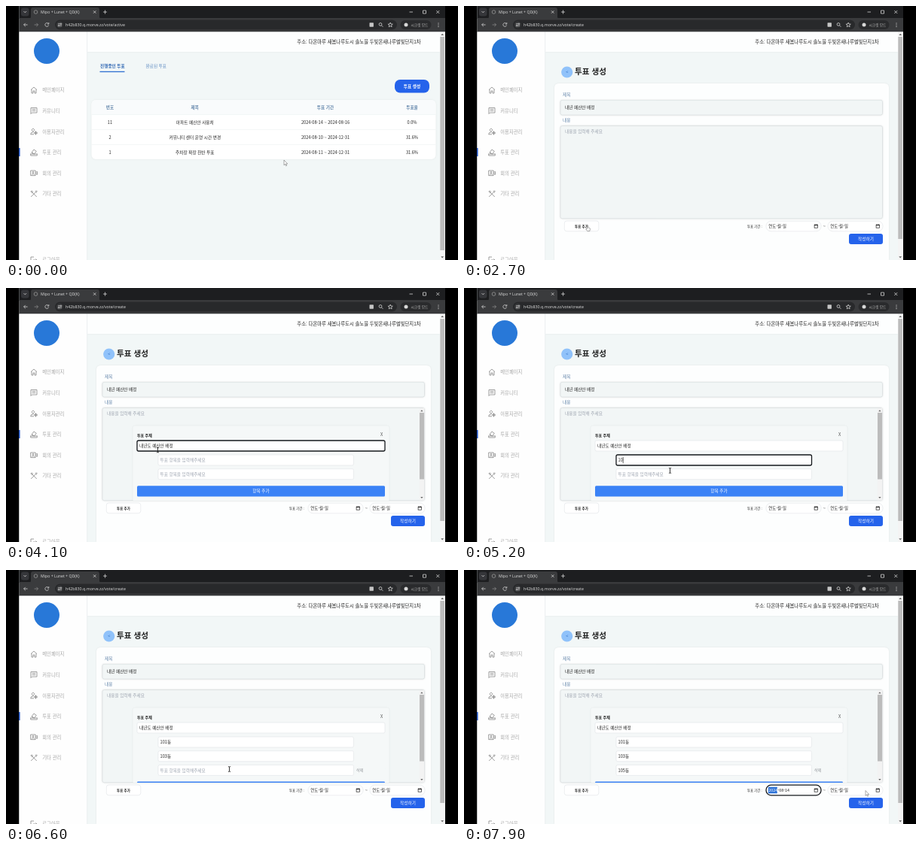
Animation, 600 px wide and 338 px high, one loop 8000 ms. Source, as an HTML page:

```html
<!DOCTYPE html>
<html lang="ko">
<head>
<meta charset="utf-8">
<title>투표 생성</title>
<style>
html, body { margin: 0; width: 100%; height: 100%; overflow: hidden; background: #000; }
svg { display: block; width: 100vw; height: 100vh; }
text { font: 5.65px "Noto Sans CJK KR", "Noto Sans CJK", "Noto Sans", sans-serif; fill: #222; white-space: pre; }
.m { text-anchor: middle; }
.b { font-weight: 700; }
.w { fill: #fff; }
.hint { fill: #9ca3af; }
.label { fill: #6386ab; }
.ui text { font-family: "Open Sans", "Noto Sans CJK KR", sans-serif; font-size: 5.2px; fill: #dedede; }
.ui path, .ui .o { fill: none; stroke: #d4d4d4; stroke-width: .8; }
.side text { font-size: 6.3px; fill: #a6a6a6; }
.side path { fill: none; stroke: #8d8d8d; stroke-width: .85; stroke-linejoin: round; }
.field { fill: #f2f6f6; stroke: #d3dadc; stroke-width: .6; filter: drop-shadow(0 .8px .8px #0002); }
.box { fill: #fff; stroke: #dfe3e6; stroke-width: .6; }
.focus { stroke: #15181c; stroke-width: 1.3; }
.card { filter: drop-shadow(0 .5px 1.2px #00000012); }
</style>
</head>
<body>
<svg viewBox="0 0 600 338" preserveAspectRatio="none">
  <defs>
    <clipPath id="area"><rect x="128" y="159" width="428" height="124"/></clipPath>
    <g id="cal">
      <rect x="-2.2" y="-1.8" width="4.4" height="4" fill="none" stroke="#222" stroke-width=".7"/>
      <path d="M-2.2-1.3H2.2M-1.2-2.6v1M1.2-2.6v1" stroke="#222" stroke-width=".9"/>
    </g>
  </defs>
  <rect width="600" height="338"/>
  <rect x="17.5" width="565.5" height="338" fill="#f2f7f7"/>

  <g class="ui">
    <rect x="17.5" width="565.5" height="17" fill="#1d1e20"/>
    <rect x="20" y="2.5" width="10.5" height="11" rx="3" fill="#35363a"/>
    <path d="M23.5 7l1.8 1.8L27.100 7"/>
    <path d="M30 17q3 0 3-3V5q0-3 3-3h85q3 0 3 3v9q0 3 3 3z" style="fill:#3a3b3d;stroke:none"/>
    <circle class="o" cx="39.500" cy="8" r="2.300" style="stroke:#999"/>
    <text x="46" y="10">Mipo + Lunet + QD(K)</text>
    <path d="M116 6.300l3.400 3.400m0-3.400L116 9.700M129 8h5m-2.500-2.500v5"/>
    <path d="M535.500 8h4.500M553.500 6h4v4h-4zM571.300 6l4 4m0-4l-4 4"/>
    <rect x="17.5" y="16" width="565.5" height="18.500" fill="#3a3b3d"/>
    <path d="M28.600 25h-5m2.200-2.200L23.600 25l2.200 2.200"/>
    <path d="M37.600 25h5m-2.200-2.200l2.200 2.200-2.200 2.200" style="stroke:#8a8a8a"/>
    <path d="M56.200 23.500a2.400 2.400 0 1 0 .4 2M56.800 22v2h-2"/>
    <rect x="65" y="18.500" width="454" height="13" rx="6.500" fill="#28292b"/>
    <circle cx="71.300" cy="25" r="4.200" fill="#3a3b3d"/>
    <path d="M69 23.800h3m-1 2.400h3"/>
    <circle class="o" cx="73" cy="23.800" r=".8"/><circle class="o" cx="70" cy="26.200" r=".8"/>
    <text id="url" x="79" y="27" style="font-size:5.300px"></text>
    <rect x="482.500" y="22.300" width="5.400" height="5.400" rx=".6" fill="#c6c6c6"/>
    <circle class="o" cx="497" cy="24.400" r="1.900"/><path d="M498.400 25.800l2 2"/>
    <path d="M510.200 22l.9 2 2.200.2-1.700 1.400.5 2.200-1.900-1.200-1.900 1.200.5-2.200-1.700-1.400 2.200-.2z"/>
    <rect x="523.500" y="19" width="41" height="12" rx="6" fill="#2a2b2d"/>
    <circle cx="531" cy="25" r="2.500" fill="#d8d8d8"/>
    <text x="537.500" y="26.800" style="font-size:4.700px;fill:#bbb">시크릿 모드</text>
    <path d="M574 22.500v5.600" style="stroke-dasharray:1 1.200;stroke-width:1.100"/>
  </g>

  <rect x="108" y="34.500" width="468" height="26.500" fill="#fdfefe" class="card"/>
  <text x="550.500" y="49.700" text-anchor="end" style="font-size:6.350px">주소: 다온마루 새봄나루도시 솔노을 두빛온새나루별빛단지1차</text>

  <g class="side">
    <rect x="17.500" y="34.500" width="90" height="303.500" fill="#fefefe"/>
    <path d="M107.700 34.500V338" style="stroke:#e6ebec;stroke-width:.6"/>
    <circle cx="54" cy="60" r="17" fill="#2878d8"/>
    <rect x="17" y="189" width="1.600" height="11" fill="#2457c5"/>
    <g id="menu"></g>
  </g>

  <rect x="576" y="34.500" width="7" height="303.500" fill="#f4f4f4"/>
  <rect id="thumb" x="576.300" y="41" width="5.700" fill="#bcbcbc"/>
  <path d="M577.300 39l1.900-2.300 1.900 2.300zM577.300 333.300l1.900 2.300 1.900-2.300z" fill="#666"/>

  <g id="list">
    <text class="b" x="125" y="82.300" style="fill:#2f67b3">진행중인 투표</text>
    <text x="185.500" y="82.300" style="fill:#5d8ac0">완료된 투표</text>
    <rect x="124.500" y="86.800" width="33" height="1.300" fill="#2f6fd0"/>
    <rect x="516" y="98" width="46" height="17.500" rx="7" fill="#2563eb"/>
    <text class="m w b" x="539" y="108.800">투표 생성</text>
    <rect class="card" x="113.500" y="125" width="457" height="79" rx="6" fill="#fff"/>
    <path d="M113.500 144.500V131q0-6 6-6h445q6 0 6 6v13.500z" fill="#f9fbfc"/>
    <path d="M113.500 144.500h457m-457 20h457m-457 20h457" stroke="#edf1f2" stroke-width=".6"/>
    <g id="rows"></g>
  </g>

  <g id="create">
    <circle cx="136.700" cy="88" r="7.600" fill="#90c2fa"/>
    <text class="m" x="136.700" y="90" style="fill:#2f6fc4">&lt;</text>
    <text class="b" x="147" y="90.500" style="font-size:10.600px">투표 생성</text>
    <path class="card" d="M120 338V109q0-6 6-6h432q6 0 6 6v229z" fill="#fdfefe"/>
    <text class="label" x="131" y="120">제목</text>
    <rect class="field" x="128" y="125.300" width="427.500" height="19.700" rx="2.500"/>
    <g id="title"></g>
    <text class="label" x="131" y="154.200">내용</text>
    <rect class="field" x="128" y="159.500" width="427.500" height="123.300" rx="2.500"/>
    <text class="hint" x="134" y="169">내용을 입력해 주세요</text>

    <g id="modal" clip-path="url(#area)">
      <rect x="168.500" y="183.500" width="340" height="120" rx="3" fill="#f5f8f8" class="card"/>
      <text class="b" x="174" y="198.300" style="font-size:5px">투표 주제</text>
      <text class="m" x="498.700" y="197" style="fill:#555">X</text>
      <g id="subject"></g><g id="opt1"></g><g id="opt2"></g>
      <g id="third">
        <g id="opt3"></g>
        <text x="465" y="268" style="font-size:5px;fill:#8b8f94">삭제</text>
      </g>
      <g id="add">
        <rect x="174" width="329" height="14.300" rx="1.500" fill="#3b82f6"/>
        <text class="m w" x="338.500" y="9.200">항목 추가</text>
      </g>
      <rect x="548.800" y="160" width="6.400" height="122.500" fill="#f3f3f3"/>
      <rect x="549" y="166" width="6" height="88.500" fill="#bcbcbc"/>
      <path d="M550.200 164.300l1.700-2 1.700 2zM550.200 278l1.700 2 1.700-2z" fill="#666"/>
    </g>

    <rect class="box" x="133.300" y="286" width="45.500" height="13.700" rx="3"/>
    <text class="m b" x="156" y="294.500" style="font-size:4.500px">투표 추가</text>
    <text x="376" y="294.700" style="font-size:4.400px">투표 기간 :</text>
    <rect id="from" class="box" x="401" y="286.200" width="73" height="13.600" rx="6.500"/>
    <rect id="year" x="403.800" y="288.700" width="12" height="8.600" fill="#2f74d8"/>
    <text id="date" x="404.300" y="295" style="font-size:5.400px"></text>
    <use href="#cal" x="467.300" y="293"/>
    <text class="m" x="478.300" y="295">~</text>
    <rect class="box" x="483" y="286.200" width="73" height="13.600" rx="6.500"/>
    <text x="486.300" y="295" style="font-size:5.400px">연도-월-일</text>
    <use href="#cal" x="549.300" y="293"/>
    <rect x="511" y="303" width="45" height="14" rx="3" fill="#2563eb"/>
    <text class="m w" x="533.500" y="312">작성하기</text>
  </g>

  <g id="cursor" stroke="#555" stroke-width=".5" stroke-linejoin="round" fill="#fff">
    <path d="M0 0v6.800l1.600-1.400 1.100 2.400 1-.5-1.100-2.300h2.100z"/>
    <path d="M-1.500-3.300h1.100l.4.400.4-.4h1.100M-1.500 3.300h1.100l.4-.4.4.4h1.100M0-2.900v5.800" fill="none" stroke="#222" stroke-width=".9"/>
    <path d="M-.7-2.200q.7-.8 1.300 0V.4l2.300.6q.6.300.5 1L2.900 5H-.3l-2-2.700q0-.9 1.600-.2z"/>
  </g>
</svg>
<script>
const LOOP = 8000, STEP = 100;
const $ = id => document.getElementById(id);
const show = (id, on) => $(id).style.display = on ? '' : 'none';

// Sidebar entries: label, y, icon path around (37, y)
const menu = [
  ['메인페이지', 112, 'M-4-.5L0-4 4-.5M-3-1V4h2V1h2v3h2V-1'],
  ['커뮤니티', 139.500, 'M-4-4h8v6.500h-6.500L-4 4zM-2.300-2h4.600M-2.300 0h4.600'],
  ['이용자관리', 167.300, 'M-1-4a1.700 1.700 0 1 1-.1 0M-4.300 3.500q0-3.300 4-3M-4.300 3.500H0M2.500 0a1.600 1.600 0 1 1-.1 0M2.500-.8v5M.2 1.700h4.600'],
  ['투표 관리', 195, 'M-3 0l3-4 3.300 2.300L.5 2zM-3 0l3.500 2M-4.300 1.500V4h8.600V1.500M-4.300 2h8.600'],
  ['회의 관리', 222.300, 'M-4.300-3.300h6.500v6.600h-6.500zM2.200-.5l2.300-1.500v4L2.200.5M-1-1.800a.9.900 0 1 1-.1 0M-3 2q2-2.500 4 0'],
  ['기타 관리', 250, 'M-3.800 4L3-2.800M3.800 4L-2.500-2.300M-4-3.300l1.500-.7L-1.300-2.300l-1.200 1zM1.500-3q1.200-1.600 2.800-.6L3-2.300l.8.700'],
  ['로그아웃', 338, 'M0-4h-4v8M-1 0h5M2.500-1.500L4 0']
];
$('menu').innerHTML = menu.map(([label, y, d]) =>
  `<path transform="translate(37 ${y})" d="${d}"/><text x="48.300" y="${y + 2.4}">${label}</text>`).join('');

const table = [
  ['번호', '제목', '투표 기간', '투표율'],
  ['11', '아파트 예산안 사용처', '2024-08-14 ~ 2024-08-16', '0.0%'],
  ['2', '커뮤니티 센터 운영 시간 변경', '2024-08-10 ~ 2024-12-31', '31.6%'],
  ['1', '주차장 확장 찬반 투표', '2024-08-11 ~ 2024-12-31', '31.6%']
];
const cols = [138, 250.8, 424, 539];
$('rows').innerHTML = table.map((row, r) => row.map((cell, c) =>
  `<text class="m${r ? '' : ' label b'}" x="${cols[c]}" y="${136.5 + r * 20}">${cell}</text>`).join('')).join('');

// Text inputs: id, frame (or none), text position, hint, focus span, typing start, one entry per step
const optHint = '투표 항목을 입력해주세요';
const inputs = [
  { id: 'title', x: 134, y: 137.300, hint: '제목을 입력해 주세요', on: 1200, off: 2600, start: 1300,
    keys: 'ㄴ|내|내년|내년|내년|내년 |내년 예|내년 예산|내년 예산안|내년 예산안 배|내년 예산안 배정' },
  { id: 'subject', box: [174, 203, 329], x: 177, y: 212.200, hint: '투표 주제를 입력해주세요', on: 3300, off: 4700, start: 3400,
    keys: '내|내년|내년도|내년도 예|내년도 예산안|내년도 예산안 배|내년도 예산안 배정' },
  { id: 'opt1', box: [202, 222, 259.500], x: 204.500, y: 231.200, hint: optHint, on: 4700, off: 5600, start: 5000,
    keys: '1|10|10|101|101동' },
  { id: 'opt2', box: [202, 240.700, 259.500], x: 204.500, y: 249.900, hint: optHint, on: 5600, off: 6300, start: 5700,
    keys: '1|10|103|103동' },
  { id: 'opt3', box: [202, 259.400, 259.500], x: 204.500, y: 268.600, hint: optHint, on: 6700, off: 7500, start: 6800,
    keys: '1|10|105|105동' }
];
for (const f of inputs) {
  f.keys = f.keys.split('|');
  const frame = f.box ? `<rect class="box" x="${f.box[0]}" y="${f.box[1]}" width="${f.box[2]}" height="14" rx="2"/>` : '';
  $(f.id).innerHTML = `${frame}<text x="${f.x}" y="${f.y}"></text><rect y="${f.y - 6.3}" width=".7" height="8.500" fill="#222"/>`;
  [f.text, f.caret] = [$(f.id).querySelector('text'), $(f.id).lastChild];
  f.frame = frame && $(f.id).firstChild;
}

function drawInput(f, t) {
  const i = Math.min(Math.floor((t - f.start) / STEP), f.keys.length - 1);
  const value = i < 0 ? '' : f.keys[i];
  const focused = t >= f.on && t < f.off;
  f.text.textContent = value || f.hint;
  f.text.classList.toggle('hint', !value);
  if (f.frame) f.frame.classList.toggle('focus', focused);
  const blink = (t + 800) % 1000 < 400;
  f.caret.style.display = focused && blink ? '' : 'none';
  if (focused) f.caret.setAttribute('x', f.x + (value ? f.text.getComputedTextLength() : 0));
}

// Pointer stops: time, x, y, shape (0 arrow, 1 text, 2 hand)
const stops = [
  [0, 369, 205, 0], [500, 540, 108, 2], [700, 540, 108, 0], [1100, 252.500, 140, 1],
  [2300, 252.500, 140, 1], [2600, 164, 294.500, 2], [2800, 164, 294.500, 0], [3200, 201.500, 215.500, 1],
  [4200, 201.500, 215.500, 1], [4600, 273.500, 230, 1], [4800, 273.500, 230, 1], [5100, 273.500, 243, 1],
  [5400, 273.500, 243, 1], [5600, 273.500, 247, 1], [6000, 273.500, 247, 1], [6200, 297, 270, 2],
  [6400, 297, 270, 1], [6600, 296.500, 265, 1], [7200, 296.500, 265, 0], [7500, 467, 293, 0],
  [7600, 467, 293, 0], [7900, 533, 293.500, 0]
];
function drawCursor(t) {
  const i = stops.findLastIndex(s => s[0] <= t);
  const a = stops[i], b = stops[i + 1] || a;
  const p = b === a ? 0 : (t - a[0]) / (b[0] - a[0]);
  const e = p * p * (3 - 2 * p);
  $('cursor').setAttribute('transform', `translate(${a[1] + (b[1] - a[1]) * e} ${a[2] + (b[2] - a[2]) * e})`);
  [...$('cursor').children].forEach((c, k) => c.style.display = k === a[3] ? '' : 'none');
}

function draw(t) {
  const creating = t >= 700, three = t >= 6300, dated = t >= 7600;
  show('list', !creating);
  show('create', creating);
  show('modal', t >= 2800);
  show('third', three);
  show('year', dated);
  $('url').textContent = 'h42b830.q.morve.zz/vote/' + (creating ? 'create' : 'active');
  $('thumb').setAttribute('height', creating ? 269 : 284);
  $('add').setAttribute('transform', `translate(0 ${three ? 281.6 : 263.2})`);
  $('from').classList.toggle('focus', dated);
  $('date').innerHTML = dated ? '<tspan fill="#fff">2024</tspan>-08-14' : '연도-월-일';
  if (creating) inputs.forEach(f => drawInput(f, t));
  drawCursor(t);
}

let last = -1;
const origin = performance.now();
function tick() {
  const t = Math.floor((performance.now() - origin) % LOOP / STEP) * STEP;
  if (t !== last) draw(last = t);
  requestAnimationFrame(tick);
}
tick();
</script>
</body>
</html>
```
